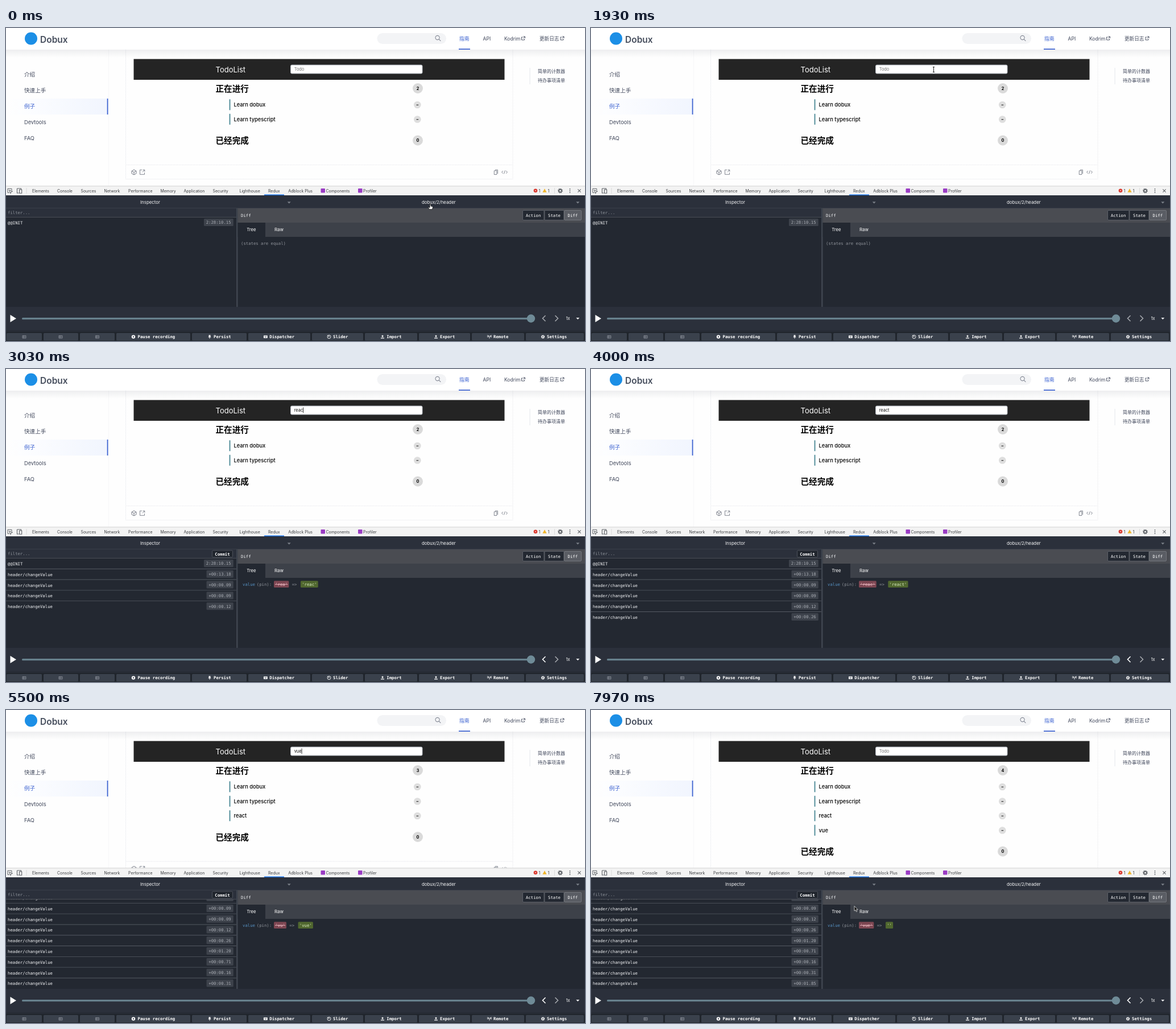
Recreate the animation shown at these times as an HTML page with a canvas. Size 1018x550 px, loop 8 s.

```html
<!DOCTYPE html>
<html lang="zh">
<head>
<meta charset="utf-8">
<style>
html, body { margin: 0; width: 1018px; height: 550px; overflow: hidden; background: #fff; }
canvas { display: block; }
</style>
</head>
<body>
<canvas id="stage" width="1018" height="550"></canvas>
<script>
const c = document.getElementById('stage').getContext('2d');
const SANS = 'Inter, "Noto Sans CJK SC", "Noto Sans CJK", sans-serif';
const MONO = '"DejaVu Sans Mono", monospace';
const LOOP = 8000, CLICK = 1950, MOVE = 7480, CH = 4.39;
const NAVY = '#3f465a', BLUE = '#3c62d0', PANEL = '#2b303b', DARK = '#232831';

// [time, field value, delay shown in the log]
const EDITS = [
  [2530, 'r', '13.18'], [2620, 're', '00.09'], [2710, 'rea', '00.09'],
  [2830, 'reac', '00.12'], [3090, 'react', '00.26'], [4290, '', '01.20'],
  [5000, 'v', '00.71'], [5160, 'vu', '00.16'], [5470, 'vue', '00.31'],
  [7320, '', '01.85']
];

// y is the middle of the capital letters
function text(s, x, y, size, color, { font = SANS, weight = 400, align = 'left' } = {}) {
  c.font = `${weight} ${size}px ${font}`;
  c.textAlign = align;
  c.fillStyle = color;
  c.fillText(s, x, y + size * .364);
}
const mono = (s, x, y, color, weight = 400) => text(s, x, y, 7.29, color, { font: MONO, weight });

function box(x, y, x2, y2, fill, r = 0, stroke) {
  c.beginPath();
  c.roundRect(x, y, x2 - x, y2 - y, r);
  if (fill) { c.fillStyle = fill; c.fill(); }
  if (stroke) { c.strokeStyle = stroke; c.lineWidth = 1; c.stroke(); }
}
function disc(x, y, r, fill) {
  c.beginPath();
  c.arc(x, y, r, 0, 7);
  c.fillStyle = fill;
  c.fill();
}
// SVG path drawn at an offset
function path(d, x, y, { fill, stroke, width = 1 } = {}) {
  const p = new Path2D(d);
  c.save();
  c.translate(x, y);
  if (fill) { c.fillStyle = fill; c.fill(p); }
  if (stroke) { c.strokeStyle = stroke; c.lineWidth = width; c.stroke(p); }
  c.restore();
}
const ring = 'M3 0A3 3 0 1 1 -3 0A3 3 0 1 1 3 0';
const down = (x, y, color) => path('M-3 -1.5H3L0 1.8Z', x, y, { fill: color });
const linkOut = (x, y, color, s = 1) =>
  path(`M${-s} -2H-3V3H2V${s}M0 -3H3V0M3 -3L-.5 .5`, x, y, { stroke: color, width: .9 });

function drawSite() {
  box(0, 0, 1018, 278, '#fefefe');
  const g = c.createLinearGradient(0, 124, 180, 124);
  g.addColorStop(0, '#fefefe');
  g.addColorStop(.2, '#fcfdff');
  g.addColorStop(1, '#f1f5fe');
  box(0, 124, 178, 152, g);
  box(177.7, 124, 179.5, 152, BLUE);
  box(180, 38, 180.6, 124, '#f0f1f4');
  box(180, 152, 180.6, 278, '#f0f1f4');
  ['介绍', '快速上手', '例子', 'Devtools', 'FAQ'].forEach((s, i) =>
    text(s, 32, 82 + 28 * i, i < 3 ? 9.6 : 9.3, i === 2 ? BLUE : NAVY));
  box(920.7, 70, 921.5, 99, '#dfe2e8');
  text('简单的计数器', 935, 76, 8, NAVY);
  text('待办事项清单', 935, 92, 8, NAVY);
}

function drawTopBar() {
  const g = c.createLinearGradient(0, 38, 0, 52);
  g.addColorStop(0, 'rgba(70,75,95,.09)');
  g.addColorStop(1, 'rgba(70,75,95,0)');
  box(0, 38, 1018, 52, g);
  box(0, 0, 1018, 38, '#fff');
  disc(44, 18.5, 11, '#1c8fe6');
  text('Dobux', 60, 20.5, 15.5, '#454d5c', { weight: 600 });
  box(652.5, 9, 774, 28, '#f3f4f6', 9.5);
  path('M3.2 0A3.6 3.6 0 1 1 -4 0A3.6 3.6 0 1 1 3.2 0M2.2 2.6L5.3 5.8', 759, 17, { stroke: '#858a96', width: 1.1 });
  text('指南', 797, 18.5, 8.8, BLUE);
  box(796, 36.3, 816, 38, BLUE);
  text('API', 838.5, 18.5, 8.6, NAVY);
  text('Kodrim', 876, 18.5, 8.5, NAVY);
  text('更新日志', 938, 18.5, 8.6, NAVY);
  linkOut(909.5, 18, NAVY);
  linkOut(978, 18, NAVY);
}

function heading(s, count, y) {
  text(s, 368.5, y + .3, 14.6, '#000', { weight: 700 });
  disc(724, y, 9, '#dadada');
  text(count, 724, y, 7.2, '#000', { weight: 700, align: 'center' });
}

function drawDemo(t, value, todos, last) {
  const shift = 25.5 * (todos.length - 2);
  c.setLineDash([1.5, 1]);
  box(210.5, 30.5, 891, 265.5 + shift, null, 0, '#e9eaee');
  box(210.5, 240.5 + shift, 891, 240.6 + shift, null, 0, '#efeff2');
  c.setLineDash([]);

  box(224.5, 54.5, 876.5, 91, '#242424');
  text('TodoList', 368.5, 73.5, 13, '#fff');
  box(500.5, 65, 732, 80, '#fff', 2, '#b4bac2');
  text(value || 'Todo', 506.7, 72.3, 7.4, value ? '#111' : '#757575');
  if (t >= CLICK && (t - last) % 1000 < 500) {
    const w = value ? c.measureText(value).width : 0;
    box(506.8 + w, 67.5, 507.6 + w, 77, '#000');
  }

  heading('正在进行', todos.length, 106);
  todos.forEach((s, i) => {
    const y = 135 + 25.5 * i;
    box(392.5, y - 9.7, 394.5, y + 9.3, '#56909c');
    text(s, 400.5, y, 9.3, '#000', { weight: 500 });
    disc(723.3, y, 6.3, '#dedede');
    box(721.5, y - .3, 725.2, y + .8, '#222');
  });
  heading('已经完成', 0, 197.5 + shift);

  const y = 253.3 + shift, grey = '#767b86';
  path('M0 -4.3L4 -2V2.4L0 4.6L-4 2.4V-2ZM-4 -2L0 .2L4 -2M0 .2V4.6', 225, y, { stroke: grey, width: 1 });
  path('M-.5 -4H-4V4H4V.8M1 -4H4.3V-.8M4.3 -4L.5 0', 239.5, y, { stroke: grey, width: .9 });
  path('M-3 -2.5H1.5V4.2H-3ZM-1.5 -4H3.2V2.8', 861.3, y, { stroke: grey, width: .9 });
  path('M-2.5 -2.3L-5 0L-2.5 2.3M2.5 -2.3L5 0L2.5 2.3M1 -3L-1 3', 876.5, y, { stroke: grey, width: .9 });
}

function drawTabs() {
  box(0, 277.5, 1018, 294, '#f3f3f3');
  box(0, 277.5, 1018, 278.3, '#c9c9c9');
  const grey = '#5f6368', ink = '#3b3d40';
  path('M3 -1V-4H-4V3H-1M-1.5 -1.5L4.5 .8L2 2L1 4.5Z', 7, 286.3, { stroke: grey, width: 1 });
  path('M-4 -4H3V-2M-4 -4V4H-1M0 -2H4.2V4.3H0Z', 23.5, 286, { stroke: grey, width: 1.1 });
  box(35.7, 281, 36.4, 291, '#ccc');
  box(454, 292.4, 489, 294, '#1a73e8');
  Object.entries({
    Elements: 46, Console: 90, Sources: 131.5, Network: 172.5, Performance: 215, Memory: 271.5,
    Application: 312.5, Security: 363.5, Lighthouse: 410.5, Redux: 461, 'Adblock Plus': 496.3,
    Components: 562.5, Profiler: 628
  }).forEach(([s, x]) => text(s, x, 286, 6.95, ink));
  box(553.5, 282, 561, 289.5, '#9a3cc4', 1);
  box(619, 282, 626.5, 289.5, '#9a3cc4', 1);
  disc(931, 285.7, 3.3, '#d93025');
  path('M-1 -1L1 1M1 -1L-1 1', 931, 285.7, { stroke: '#fff', width: .8 });
  text('1', 936.5, 286, 7, ink);
  path('M0 -3.4L3.6 3H-3.6Z', 947, 285.7, { fill: '#f0b429' });
  text('1', 952.5, 286, 7, ink);
  box(964, 281, 964.6, 291, '#ccc');
  gear(974.5, 286, 3.2, grey);
  for (const d of [-3, 0, 3]) disc(991.5, 286 + d, .9, grey);
  path('M-2.6 -2.6L2.6 2.6M2.6 -2.6L-2.6 2.6', 1008, 286, { stroke: grey, width: 1.1 });
}

function gear(x, y, r, color) {
  c.save();
  c.strokeStyle = color;
  c.lineWidth = r * .55;
  c.beginPath();
  c.arc(x, y, r * .75, 0, 7);
  c.stroke();
  c.lineWidth = r * .5;
  c.setLineDash([r * .45, r * .42]);
  c.beginPath();
  c.arc(x, y, r * 1.12, 0, 7);
  c.stroke();
  c.restore();
}

function drawLog(n) {
  box(0, 332, 405, 490, DARK);
  c.save();
  c.beginPath();
  c.rect(0, 332.5, 405, 157.5);
  c.clip();
  const scroll = Math.max(0, 342 + 18.8 * n - 480.5);
  for (let i = 0; i <= n; i++) {
    const y = 342 + 18.8 * i - scroll;
    if (i) box(0, y - 10, 405, y - 9.1, '#555a63');
    box(i ? 352.5 : 348, y - 7, 399.8, y + 6, '#3d424b', 1.5);
    mono(i ? 'header/changeValue' : '@@INIT', 3, y + .3, '#f2f3f5');
    mono(i ? '+00:' + EDITS[i - 1][2] : '2:28:10.15', i ? 356.3 : 351.7, y - .3, '#a9adb4');
  }
  c.restore();
  box(0, 317, 405, 332, PANEL);
  box(0, 332, 405, 332.8, '#565a62');
  mono('filter...', 3, 324.8, '#8b9098');
  if (n > 1) {
    box(362.5, 318.8, 398.5, 330.8, '#20252d', 1.5, '#4d525b');
    mono('Commit', 367.3, 325, '#fff', 700);
  }
}

function drawDiff(n, before, after) {
  box(407.5, 317, 1018, 342, '#4a4c52');
  mono('Diff', 413, 329, '#f2f3f5');
  box(908.5, 320.5, 946, 337.5, DARK, 1.5, '#5b5f67');
  box(947, 320.5, 981, 337.5, DARK, 0, '#5b5f67');
  box(981.5, 320.5, 1011.5, 337.5, '#5a5d64', 1.5, '#73767c');
  mono('Action', 914, 329, '#fff');
  mono('State', 953, 329, '#fff');
  mono('Diff', 987.5, 329, '#fff');
  box(407.5, 342, 1018, 367, '#3d4149');
  box(407.5, 342, 456, 367, DARK);
  text('Tree', 423.3, 354.3, 7.7, '#fff');
  text('Raw', 472, 354.3, 7.9, '#fff');
  if (!n) return mono('(states are equal)', 413, 378.8, '#8e9299');

  mono('value', 416, 378.3, '#5690c2');
  mono('(pin):', 440.8, 378.3, '#8e9299');
  const chip = (s, x, fill, color) => {
    const end = x + (s.length + 2) * CH + 4.4;
    box(x, 372.3, end, 384, fill, 1.5);
    mono(`'${s}'`, x + 2.2, 378.3, color);
    return end;
  };
  const end = chip(before, 471, '#7d4652', '#f3bfc7');
  box(473, 378, end - 2, 378.8, '#f3bfc7');
  mono('=>', end + 5.3, 378.5, '#8e9299');
  chip(after, end + 20.6, '#50672f', '#d9ecc0');
}

function drawFooter(n) {
  box(0, 490, 1018, 531, PANEL);
  path('M-5 -6.5L5.5 0L-5 6.5Z', 12.5, 510.5, { fill: '#fff' });
  box(28, 509, 918, 512.3, '#67818d', 1.5);
  disc(923, 510.5, 7.2, '#6f8b97');
  path('M2.5 -5L-2.5 0L2.5 5', 946, 510.3, { stroke: n ? '#fff' : '#a5a8ae', width: 1.6 });
  path('M-2.5 -5L2.5 0L-2.5 5', 968, 510.3, { stroke: '#a5a8ae', width: 1.6 });
  text('1x', 984.5, 510.5, 7.4, '#fff');
  down(1005.3, 510.5, '#e8e9eb');

  box(0, 531, 1018, 550, '#20252c');
  box(0, 531, 1018, 534, '#272c36');
  const edges = [1, 66, 130, 194, 327, 426, 538, 631, 726, 819, 914, 1019];
  for (let i = 0; i < 11; i++) box(edges[i], 536, edges[i + 1] - 3, 549, '#3a414c', 1.5);
  for (const x of [32, 96, 160.5])
    path('M-3 -2.3H3V2.3H-3ZM-3 0H3M-.8 -2.3V2.3', x, 542.8, { stroke: '#8e949d', width: .8 });

  Object.entries({
    'Pause recording': 231.5, Persist: 365, Dispatcher: 463.3, Slider: 575,
    Import: 669.3, Export: 763, Remote: 857, Settings: 951
  }).forEach(([s, x]) => mono(s, x, 542.8, '#fff', 700));
  const white = { fill: '#fff' }, line = { stroke: '#fff', width: .9 }, y = 542.6;
  disc(224, y, 3.2, '#fff');
  disc(224, y, 1.2, '#3a414c');
  path('M-1.5 -3H1.5V-.5L2.5 .8H.5V3.2H-.5V.8H-2.5L-1.5 -.5Z', 358, y, white);
  box(453, y - 2.3, 459.7, y + 2.3, '#fff', .6);
  path('M-2 -.7H2M-1.5 1H1.5', 456.3, y, { stroke: '#3a414c', width: .7 });
  path(ring + 'M-3 -3L0 0V-2', 568, y, line);
  path('M0 -3.2L2.2 -.8H.7V1H-.7V-.8H-2.2ZM-3 1.7H3V3H-3Z', 662, y, white);
  path('M0 -3.2L2.2 -.8H.7V1H-.7V-.8H-2.2ZM-3 1.7H3V3H-3Z', 756, y, white);
  path('M0 -1V3M-1.5 -2.6V.4M1.5 -2.6V.4M-3.2 -3V1M3.2 -3V1', 850, y, line);
  gear(944, y, 2.4, '#fff');
}

function drawDevtools(n, before, after) {
  drawTabs();
  box(0, 294, 1018, 490, PANEL);
  box(0, 316, 1018, 317, '#3a3f49');
  text('Inspector', 236, 306.5, 7.85, '#f4f5f6');
  text('dobux/2/header', 731, 306.5, 7.85, '#f4f5f6');
  down(497.7, 306.7, '#7b8089');
  down(1005.3, 306.7, '#7b8089');
  box(407.5, 317, 1018, 490, DARK);
  drawLog(n);
  box(405, 317, 407.5, 490, '#3f454f');
  drawDiff(n, before, after);
  drawFooter(n);
}

const ease = (t, a, b) => {
  const k = Math.min(1, Math.max(0, (t - a) / (b - a)));
  return k * k * (3 - 2 * k);
};
const HAND = 'M-.9 0Q0 -1 .9 0V3.2L3.8 4Q4.6 4.3 4.4 5.5L3.6 9H-1.4L-3.6 5.8Q-3.2 4.6 -.9 6Z';
const ARROW = 'M0 0V8.6L2 6.9L3.4 10L4.9 9.3L3.5 6.3H6.2Z';
const IBEAM = 'M-1.6 -4.5H1.6M0 -4.5V4.5M-1.6 4.5H1.6';

function drawPointer(t) {
  const style = { fill: '#fff', stroke: '#111', width: .8 };
  const arrow = { fill: '#111', stroke: '#fff', width: .7 };
  if (t < CLICK) {
    const k = ease(t, 1250, 1850);
    const x = 746 + 6.5 * ease(t, 300, 1100) - 150 * k;
    const y = 309.7 - 2.7 * ease(t, 300, 1100) - 234 * k;
    if (k === 0) path(HAND, x, y, style);
    else if (y > 80) path(ARROW, x, y, arrow);
    else path(IBEAM, x, y, { stroke: '#111', width: .9 });
  } else if (t < EDITS[0][0]) {
    path(IBEAM, 602.5, 73, { stroke: '#111', width: .9 });
  } else if (t >= MOVE) {
    const k = ease(t, MOVE, 7950);
    path(ARROW, 602.5 - 139.5 * k, 90 + 254.5 * k, arrow);
  }
}

function draw(t) {
  const done = EDITS.filter(e => e[0] <= t), n = done.length;
  const values = ['', ...done.map(e => e[1])];
  const added = values.filter((v, i) => v && values[i + 1] === '');
  const last = n ? done[n - 1][0] : CLICK;
  drawSite();
  drawDemo(t, values[n], ['Learn dobux', 'Learn typescript', ...added], last);
  drawTopBar();
  drawDevtools(n, values[n - 1], values[n]);
  drawPointer(t);
}

const start = performance.now();
(function tick() {
  draw((performance.now() - start) % LOOP);
  requestAnimationFrame(tick);
})();
</script>
</body>
</html>
```
